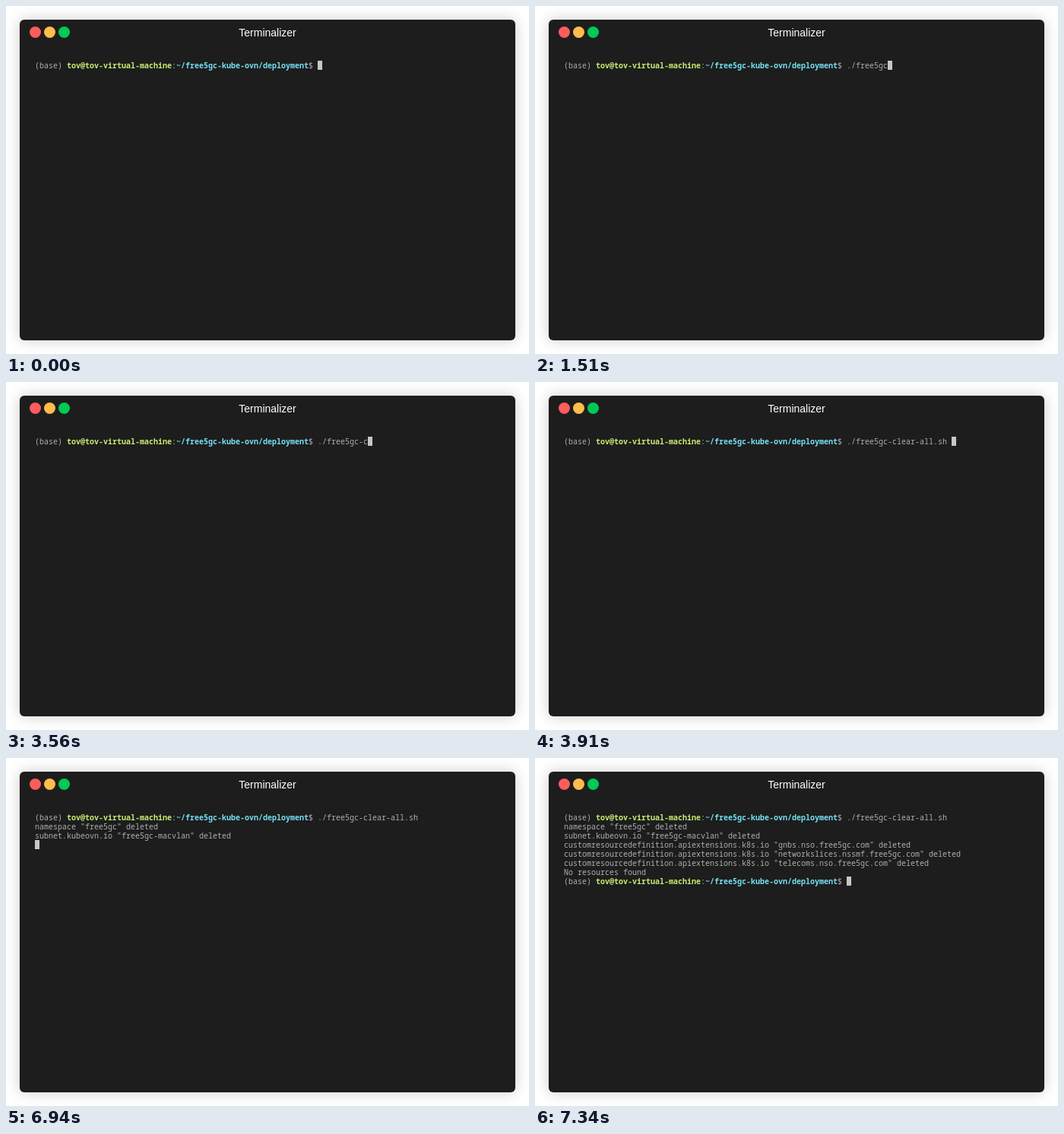
These frames come from a looping animation (688x458 px, 8 s). An HTML page:

```html
<!DOCTYPE html>
<html lang="en">
<head>
<meta charset="utf-8">
<title>Terminal</title>
<style>
  html, body { margin: 0; width: 100%; height: 100%; overflow: hidden; background: #fff; }
  #window {
    position: absolute; left: 18px; top: 18px; width: 652px; height: 422px;
    background: #1d1d1d; border-radius: 6px; box-shadow: 0 0 18px #ccc;
  }
  #title {
    position: absolute; top: 9px; width: 100%; text-align: center;
    font: 14px/16px "Liberation Sans", Arial, sans-serif; color: #fff;
  }
  .dot { position: absolute; top: 9px; width: 15px; height: 15px; border-radius: 50%; }
  #screen {
    position: absolute; left: 20px; top: 54px; margin: 0;
    font: 10px/12px "Noto Sans Mono", "DejaVu Sans Mono", monospace; color: #afafaf;
    font-variant-ligatures: none;
  }
  #screen b { font-weight: 700; }
  .host { color: #c8ed71; }
  .path { color: #75dff2; }
  .cursor { display: inline-block; width: 6px; height: 12px; vertical-align: top; background: #c7c7c7; }
</style>
</head>
<body>
<div id="window">
  <div class="dot" style="left:13px;background:#ff5c5c"></div>
  <div class="dot" style="left:32px;background:#ffbd4c"></div>
  <div class="dot" style="left:51px;background:#00ca56"></div>
  <div id="title">Terminalizer</div>
  <pre id="screen"></pre>
</div>
<script>
const DURATION = 8000;
const PROMPT = '(base) <b class="host">tov@tov-virtual-machine</b>:' +
  '<b class="path">~/free5gc-kube-ovn/deployment</b>$ ';
const CRD = 'customresourcedefinition.apiextensions.k8s.io';

// Each entry appends its output at the given time in ms.
const output = [
  [0, PROMPT],
  [870, '.'],
  [1080, '/'],
  [1290, 'f'],
  [1510, 'ree5gc'],
  [2620, '-'],
  [3560, 'c'],
  [3710, 'l'],
  [3910, 'ear-all.sh '],
  [4860, '\n'],
  [4940, 'namespace "free5gc" deleted\n'],
  [6940, 'subnet.kubeovn.io "free5gc-macvlan" deleted\n'],
  [7030, `${CRD} "gnbs.nso.free5gc.com" deleted\n`],
  [7130, `${CRD} "networkslices.nssmf.free5gc.com" deleted\n`],
  [7240, `${CRD} "telecoms.nso.free5gc.com" deleted\n`],
  [7340, 'No resources found\n' + PROMPT],
];

const screenEl = document.getElementById('screen');
const start = performance.now();
let shown = 0;

function draw() {
  const time = (performance.now() - start) % DURATION;
  const visible = output.filter(([at]) => at <= time);
  if (visible.length !== shown) {
    shown = visible.length;
    screenEl.innerHTML = visible.map(([, text]) => text).join('') + '<span class="cursor"></span>';
  }
  requestAnimationFrame(draw);
}
draw();
</script>
</body>
</html>
```
